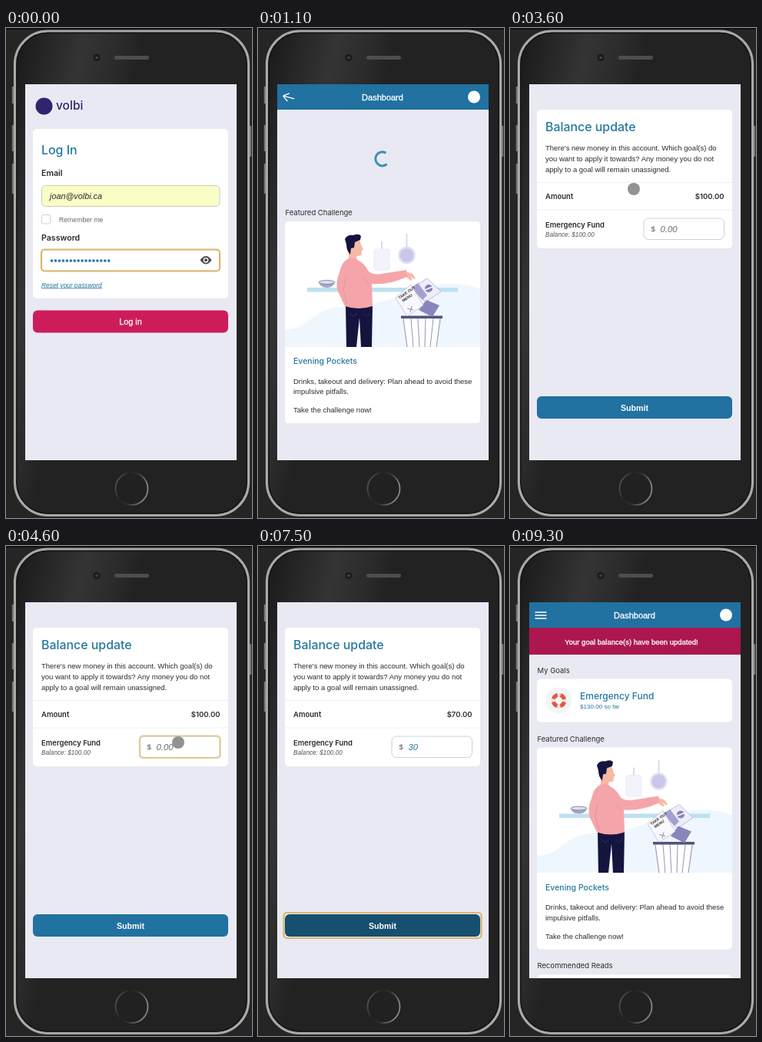
These frames come from a looping animation (320 px wide and 636 px high, 9.4 s). An HTML page:

```html
<!DOCTYPE html>
<html lang="en">
<head>
<meta charset="utf-8">
<title>Phone walkthrough</title>
<style>
html, body { margin: 0; width: 100%; height: 100%; overflow: hidden; background: #252525; }
svg { display: block; width: 100vw; height: 100vh; }
text { font: 9.5px "Liberation Sans", Arial, sans-serif; fill: #2b2b2f; white-space: pre; }
.inter { font-family: Inter, sans-serif; }
.title { font: 500 15.9px Inter, sans-serif; fill: #24779f; }
.bold { font: 600 9.5px Inter, sans-serif; }
.label { font: 600 10.6px Inter, sans-serif; }
.link { fill: #24779f; }
.white { fill: #fff; stroke: #fff; stroke-width: .3; }
.italic { font-style: italic; }
.mid { text-anchor: middle; }
.end { text-anchor: end; }
.ring { fill: none; stroke: #dcb66c; stroke-width: 2.2; }
.field { fill: #fff; stroke: #cbd0da; }
.skin { fill: #f6b9a5; }
.pink { fill: #f5a5aa; }
.navy { fill: #15143f; }
</style>
</head>
<body>
<svg viewBox="0 0 320 636" preserveAspectRatio="none">
  <defs>
    <linearGradient id="sheen" x1="0" y1="0" x2=".45" y2=".22">
      <stop offset="0" stop-color="#181818"/><stop offset=".55" stop-color="#343434"/>
      <stop offset=".8" stop-color="#2c2c2c"/><stop offset="1" stop-color="#222"/>
    </linearGradient>
    <linearGradient id="homeRim" x1="0" y1="0" x2="1" y2=".35">
      <stop offset="0" stop-color="#626262"/><stop offset=".4" stop-color="#222"/>
      <stop offset=".65" stop-color="#333"/><stop offset="1" stop-color="#858585"/>
    </linearGradient>
    <clipPath id="screen"><path d="M25 73h275v488h-275z"/></clipPath>
    <clipPath id="picture"><path d="M35 414v-158q0-5 5-5h244q5 0 5 5v158z"/></clipPath>
  </defs>

  <!-- phone -->
  <path d="M0 0h320v636h-320z" fill="#252525"/>
  <path d="M0 0h320v2h-320z" fill="#111"/>
  <path d="M9 76v22M9 126v34M9 176v39M318 127v40" stroke="#777" stroke-width="2.4"/>
  <rect x="11.5" y="4" width="304" height="628.5" rx="43" fill="url(#sheen)" stroke="#a9a9a9" stroke-width="3.2"/>
  <rect x="14" y="6.5" width="299" height="623.5" rx="40.5" fill="none" stroke="#161616" stroke-width="1.6"/>
  <rect x="141" y="36" width="45" height="5" rx="2.5" fill="#4d4d4d"/>
  <circle cx="118" cy="38.5" r="4.5" fill="#1b1b1f"/><circle cx="118" cy="38.5" r="1.7" fill="#414158"/>
  <circle cx="163.5" cy="598" r="21" fill="#212121" stroke="url(#homeRim)" stroke-width="1.8"/>

  <g clip-path="url(#screen)">
    <path d="M25 73h275v488h-275z" fill="#e9e9f3"/>

    <g id="login">
      <circle cx="49.5" cy="101.5" r="11" fill="#30246f"/>
      <text x="65" y="106" class="inter" style="font-size:15.5px;font-weight:500;fill:#30246f">volbi</text>
      <rect x="35" y="131" width="254" height="220" rx="5" fill="#fff"/>
      <text x="46" y="163.5" class="title">Log In</text>
      <text x="46" y="192" class="label">Email</text>
      <rect x="46.5" y="204.5" width="231.5" height="27" rx="5" fill="#fafdc5" stroke="#c5cdb8"/>
      <text x="57" y="222" class="italic" style="font-size:10.8px">joan@volbi.ca</text>
      <rect x="46.5" y="242.500" width="11" height="11.500" rx="1.500" class="field"/>
      <text x="69" y="251.500" style="font-size:8.7px;fill:#6a6a70">Remember me</text>
      <text x="46" y="276" class="label">Password</text>
      <rect x="46" y="288" width="232" height="27" rx="4" class="field"/>
      <path d="M59.500 302h76" stroke="#2b79a5" stroke-width="3.700" stroke-linecap="round" stroke-dasharray="0 4.950"/>
      <path d="M252.500 301.300q7.500-10.500 15 0q-7.500 10.500-15 0z" fill="#4b4b50"/>
      <circle cx="260" cy="301.300" r="2.700" fill="#4b4b50" stroke="#fff" stroke-width="1.300"/>
      <rect id="passwordRing" x="46" y="287.500" width="232" height="28" rx="4" class="ring"/>
      <text x="46" y="336.500" class="link italic" style="font-size:8.4px" text-decoration="underline">Reset your password</text>
      <rect id="loginRing" x="33.500" y="364.500" width="257" height="33" rx="4" class="ring"/>
      <rect id="loginButton" x="35" y="366.500" width="254" height="29" rx="6"/>
      <text x="162" y="385" class="white mid" style="font-size:10.8px">Log in</text>
    </g>

    <g id="dashboard">
      <path d="M25 73h275v488h-275z" fill="#e9e9f3"/>
      <path id="spinner" d="M167.700 176.700A9 9 0 1 1 166.500 162.200" transform="" fill="none" stroke="#3f8db8" stroke-width="3"/>
      <g id="goals">
        <text x="35.500" y="165" class="inter">My Goals</text>
        <rect x="35" y="172.500" width="254" height="56" rx="5" fill="#fff"/>
        <circle cx="63.500" cy="200.500" r="17" fill="#f4f4f6"/>
        <circle cx="63.500" cy="200.500" r="7.300" fill="none" stroke="#eedfd8" stroke-width="5"/>
        <circle cx="63.500" cy="200.500" r="7.300" fill="none" stroke="#df5a42" stroke-width="5" stroke-dasharray="7.467 4" stroke-dashoffset="-2"/>
        <text x="91" y="198.500" class="title" style="font-size:12px">Emergency Fund</text>
        <text x="91" y="211" class="link" style="font-size:8.1px">$130.00 so far</text>
        <text x="35.500" y="548" class="inter">Recommended Reads</text>
        <rect x="35" y="556.500" width="254" height="20" rx="5" fill="#fff"/>
      </g>
      <g id="featured">
        <text x="35.500" y="243" class="inter">Featured Challenge</text>
        <rect x="35" y="251" width="254" height="262" rx="5" fill="#fff"/>
        <g clip-path="url(#picture)">
          <path d="M35 391C65 394 70 362 112 362C170 362 205 333 245 332Q270 331 289 339V414H35z" fill="#eef7fd"/>
          <path d="M64 337h196v5.500h-196z" fill="#bfe0f1"/>
          <path d="M79 330q2 7 10.500 7t10.500-7z" fill="#a5a4c4"/>
          <ellipse cx="89.500" cy="330" rx="10.500" ry="2.500" fill="#dcdcec" stroke="#77769c" stroke-width=".8"/>
          <path d="M161 277v11M193.500 267v17" stroke="#dddcf0" stroke-width="2"/>
          <rect x="151" y="287" width="20" height="27" rx="3" fill="#f3f3fb" stroke="#e5e5f3" stroke-width=".7"/>
          <circle cx="193.500" cy="295" r="10" fill="#c9c7e7" stroke="#e1dff4" stroke-width="2.500"/>
          <!-- person -->
          <path d="M114 360h35l-1 54h-14l-2-38-4 38h-13z" class="navy"/>
          <path d="M119 370q5 8 10 0M138 370q4 8 8 0" fill="none" stroke="#32316c" stroke-width=".8"/>
          <path d="M118 280l14-5 3 9 2 3-2 2-.500 6-6 1-.500 10-10-1z" class="skin"/>
          <path d="M113 274q3-6 11-5 7-3 10 1l-1 5-7 3-1 7-4 1-1 8q-5-5-5-13z" class="navy"/>
          <path d="M192 316l9 3 4 6-2 1-5-4 3 5-2 1-8-6z" class="skin"/>
          <path d="M118 299q8-2 13 3 7 3 13 14 6 5 17 3l32-5 1 9q-25 11-46 9l1 29q-18 6-36 0l-9-19q-4-10 2-25 3-14 12-18z" class="pink"/>
          <path d="M114 324l-3 16 5 19M144 332l-7-8" fill="none" stroke="#d98c97" stroke-width=".8"/>
          <!-- rubbish bin -->
          <path d="M188 377h50l-6 37h-38z" fill="#fff" stroke="#d9d8e8" stroke-width=".6"/>
          <path d="M189 377l5 37M199 377l3 37M208 377l2 37M218 377l-1 37M228 377l-4 37M237 377l-5 37" stroke="#9594b8"/>
          <path d="M186 373.500h54v3.500h-54z" fill="#53527d"/>
          <path d="M199 338l21-13 18 17-20 14z" fill="#eeedf8" stroke="#a9a7d3" stroke-width=".7"/>
          <path d="M200 337l8-6 12 16-6 6z" fill="#a3a1cf"/>
          <circle cx="222" cy="338" r="5" fill="#8583b9"/><path d="M217 340l10-4" stroke="#fff" stroke-width="1.500"/>
          <path d="M209 366l10-13 17 7-9 15z" fill="#8986bb"/>
          <path d="M179 350l20-17 16 27-21 14z" fill="#f8f8fd" stroke="#b7b5d9" stroke-width=".7"/>
          <g transform="translate(184 352) rotate(-35)">
            <text style="font-size:5px;font-weight:bold">TAKE OUT</text>
            <text x="2" y="6" style="font-size:5px;font-weight:bold">MENU</text>
          </g>
          <path d="M194 364l8 2M200 361l-2 8" stroke="#77769c" stroke-width=".8"/>
        </g>
        <text x="46" y="436" class="title" style="font-size:10.5px">Evening Pockets</text>
        <text x="46" y="461.500">Drinks, takeout and delivery: Plan ahead to avoid these</text>
        <text x="46" y="475">impulsive pitfalls.</text>
        <text x="46" y="499">Take the challenge now!</text>
      </g>
      <g id="banner">
        <path d="M25 106h275v35h-275z" fill="#ac174f"/>
        <text x="158" y="127.500" class="white mid">Your goal balance(s) have been updated!</text>
      </g>
      <path d="M25 73h275v33h-275z" fill="#2171a1"/>
      <path id="menu" fill="none" stroke="#fff" stroke-width="1.300"/>
      <text x="162" y="93.500" class="white mid" style="font-size:11px">Dashboard</text>
      <circle cx="281" cy="89.500" r="8" fill="#fff"/>
    </g>

    <g id="balance">
      <path d="M25 73h275v488h-275z" fill="#e9e9f3"/>
      <rect x="35" y="106" width="254" height="180" rx="5" fill="#fff"/>
      <text x="46" y="134" class="title">Balance update</text>
      <text x="46" y="159">There's new money in this account. Which goal(s) do</text>
      <text x="46" y="173">you want to apply it towards? Any money you do not</text>
      <text x="46" y="187">apply to a goal will remain unassigned.</text>
      <path d="M35 200.500h254M35 236h254" stroke="#efeff4"/>
      <text x="46" y="222" class="bold">Amount</text>
      <text id="amount" x="278.500" y="222" class="bold end"></text>
      <text x="46" y="258.500" class="bold">Emergency Fund</text>
      <text x="46" y="270.500" class="italic" style="font-size:8.2px;fill:#55555c">Balance: $100.00</text>
      <rect x="174" y="247" width="104.500" height="27.500" rx="6" class="field"/>
      <rect id="fieldRing" x="174" y="246.500" width="104.500" height="28.500" rx="4" class="ring"/>
      <text x="183.500" y="264" style="fill:#55555c">$</text>
      <text id="typed" x="195.500" y="264.500" class="italic" style="font-size:11.4px"></text>
      <rect id="submitRing" x="33.500" y="476" width="257" height="33" rx="4" class="ring"/>
      <rect id="submitButton" x="35" y="478" width="254" height="29" rx="6"/>
      <text x="162" y="496.500" class="white mid" style="font-size:10.6px;font-weight:bold;stroke:none">Submit</text>
      <circle id="pointer" r="8" fill="#929292"/>
    </g>
  </g>
</svg>
<script>
const LOOP = 9400, STEP = 100;
const el = {};
document.querySelectorAll('svg [id]').forEach(node => el[node.id] = node);

const ramp = (t, from, to) => Math.min(1, Math.max(0, (t - from) / (to - from)));
const ease = p => p < .5 ? 2 * p * p : 1 - 2 * (1 - p) ** 2;
const mix = (a, b, p) => a + (b - a) * p;
const set = (node, attrs) => Object.entries(attrs).forEach(([k, v]) => node.setAttribute(k, v));
const fade = (node, opacity) => {
  node.style.opacity = opacity;
  node.style.display = opacity > 0 ? '' : 'none';
};
const tint = (from, to, p) => `rgb(${from.map((c, i) => Math.round(mix(c, to[i], p)))})`;

// Back arrow (p = 0) turns half a circle into three bars (p = 1).
function drawMenu(p) {
  const tipX = 32.5, endX = mix(39, 47.5, p);
  const outer = side => `M${tipX} ${90 + side * 4 * p}L${endX} ${90 + side * mix(5.3, 4, p)}`;
  set(el.menu, { d: `M32.5 90H47.5${outer(-1)}${outer(1)}`, transform: `rotate(${180 * p} 40 90)` });
}

function drawDashboard(t) {
  const updated = t >= 7900;
  const loaded = updated && t >= 8600;
  const shift = updated ? (loaded ? 10.5 : 35 * ramp(t, 8200, 8400)) : 0;
  fade(el.dashboard, updated ? ramp(t, 7900, 8200) : ramp(t, 700, 900));
  drawMenu(ease(updated ? ramp(t, 8250, 8750) : ramp(t, 1000, 1500)));
  fade(el.featured, updated ? 1 : 1 - ramp(t, 1400, 1500));
  fade(el.spinner, updated ? +!loaded : 1 - ramp(t, 1400, 1500));
  fade(el.goals, +loaded);
  fade(el.banner, +updated);
  set(el.featured, { transform: `translate(0 ${shift})` });
  set(el.spinner, { transform: `translate(0 ${shift}) rotate(${(t - 1100) * .36} 162 170)` });
  set(el.banner, { transform: `translate(0 ${updated ? 35 * (ramp(t, 8200, 8400) - 1) : -35})` });
}

function drawBalance(t) {
  fade(el.balance, t < 7900 ? ramp(t, 1600, 1800) : 0);
  const entry = t >= 6500 ? '30' : t >= 6200 ? '3' : '';
  el.typed.textContent = entry || '0.00';
  el.typed.style.fill = entry ? '#24779f' : '#6a6a72';
  el.amount.textContent = `$${(100 - Number(entry)).toFixed(2)}`;

  const move = ease(ramp(t, 3600, 4200));
  set(el.pointer, { cx: mix(161, 224, move), cy: mix(209, 255, move) });
  fade(el.pointer, +(t >= 3600 && t < 6200));

  const submit = ramp(t, 7100, 7400);
  fade(el.fieldRing, ramp(t, 4400, 4700) * (1 - submit));
  fade(el.submitRing, submit);
  el.submitButton.style.fill = tint([33, 113, 161], [22, 79, 111], submit);
}

function drawLogin(t) {
  fade(el.login, +(t < 900));
  const press = ramp(t, 50, 300);
  fade(el.passwordRing, 1 - press);
  fade(el.loginRing, press);
  el.loginButton.style.fill = tint([204, 29, 90], [160, 22, 71], press);
}

function render(now) {
  const t = Math.floor(now % LOOP / STEP) * STEP;
  drawLogin(t);
  drawDashboard(t);
  drawBalance(t);
  requestAnimationFrame(render);
}
render(0);
</script>
</body>
</html>
```
